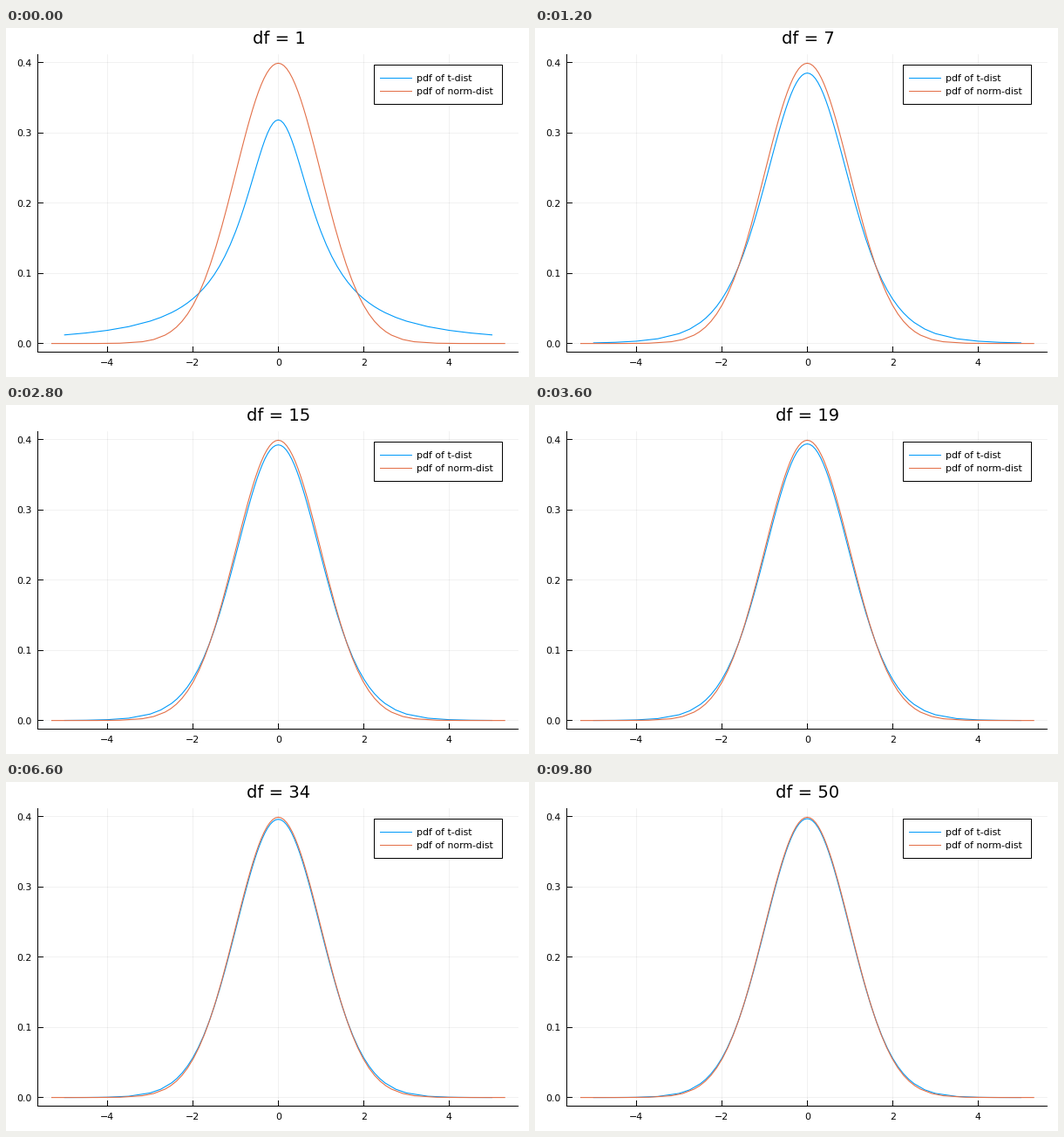
These frames come from a looping animation (600x400 px, 10000 ms). A matplotlib script:

```python
import math

import matplotlib.pyplot as plt
import numpy as np
from matplotlib.animation import FuncAnimation
from matplotlib.patches import Rectangle

plt.rcParams["font.family"] = "DejaVu Sans"
plt.rcParams["text.hinting"] = "force_autohint"

W, H, DPI = 600, 400, 100
LEFT, RIGHT, TOP, BOTTOM = 36.95, 587.75, 30.75, 371.25
BLUE, ORANGE = "#009afa", "#e36f47"
PT = 72 / DPI  # one pixel in points
TICK = 6

PEAK = 1 / math.sqrt(2 * math.pi)
X_SCALE = (RIGHT - LEFT) / (10.6 * 1.06)
Y_SCALE = (BOTTOM - TOP) / (PEAK * 1.06)


def px(x):
    return (LEFT + RIGHT) / 2 + x * X_SCALE


def py(y):
    return BOTTOM - (y + 0.03 * PEAK) * Y_SCALE


def sample_grid(half):
    """Points that are sparse in the tails and dense around the centre."""
    knots = np.concatenate([
        np.arange(0, 1, 0.0625), np.arange(1, 2.5, 0.125),
        np.arange(2.5, 3, 0.25), np.arange(3, 5.1, 0.5),
    ]) * half / 5
    return np.concatenate([-knots[:0:-1], knots])


def t_pdf(x, df):
    log_c = math.lgamma((df + 1) / 2) - math.lgamma(df / 2)
    c = math.exp(log_c) / math.sqrt(df * math.pi)
    return c * (1 + x * x / df) ** (-(df + 1) / 2)


def norm_pdf(x):
    return PEAK * np.exp(-x * x / 2)


fig = plt.figure(figsize=(W / DPI, H / DPI), dpi=DPI, facecolor="white")
ax = fig.add_axes([0, 0, 1, 1])
ax.set_xlim(0, W)
ax.set_ylim(H, 0)
ax.axis("off")


def curve(xs, ys, color, zorder):
    return ax.plot(xs, ys, color=color, lw=1.1 * PT, zorder=zorder, snap=False)[0]


def rule(x0, y0, x1, y1, color="black", width=1.0, **kw):
    """Straight line filling the pixels that hold its end points."""
    ax.plot(np.floor([x0, x1]), np.floor([y0, y1]), color=color,
            lw=width * PT, snap=True, **kw)


def label(x, y, text, size=11, ha="center"):
    return ax.text(x, y, text, fontsize=size * PT, ha=ha, va="baseline", zorder=6)


for v in (-4, -2, 0, 2, 4):
    x = px(v)
    rule(x, TOP, x, BOTTOM, width=0.7, alpha=0.08, zorder=1)
    rule(x, BOTTOM, x, BOTTOM - TICK, zorder=2)
    label(x, 387, str(v).replace("-", "\u2212"))

for i in range(5):
    y = py(i / 10)
    rule(LEFT, y, RIGHT, y, width=0.7, alpha=0.08, zorder=1)
    rule(LEFT, y, LEFT + TICK, y, zorder=2)
    label(29.5, y + 4.3, f"{i / 10:.1f}", ha="right")

rule(LEFT, BOTTOM, RIGHT, BOTTOM, zorder=2)
rule(LEFT, TOP, LEFT, BOTTOM, zorder=2)

t_x, n_x = sample_grid(5), sample_grid(5.3)
t_curve = curve([], [], BLUE, 3)
curve(px(n_x), py(norm_pdf(n_x)), ORANGE, 4)

ax.add_patch(Rectangle((422, 42), 147, 45, facecolor="white",
                       edgecolor="black", lw=PT, zorder=5))
for y, color, text in ((57, BLUE, "pdf of t-dist"),
                       (72, ORANGE, "pdf of norm-dist")):
    rule(429, y, 465, y, color, zorder=6)
    label(471, y + 4.3, text, size=10.9, ha="left")

title = label(px(0) + 0.6, 18.2, "", size=19.5)


def update(i):
    df = i + 1
    title.set_text(f"df = {df}")
    t_curve.set_data(px(t_x), py(t_pdf(t_x, df)))
    return title, t_curve


anim = FuncAnimation(fig, update, frames=50, interval=200,
                     repeat=True, repeat_delay=0, blit=False)
plt.show()
```
